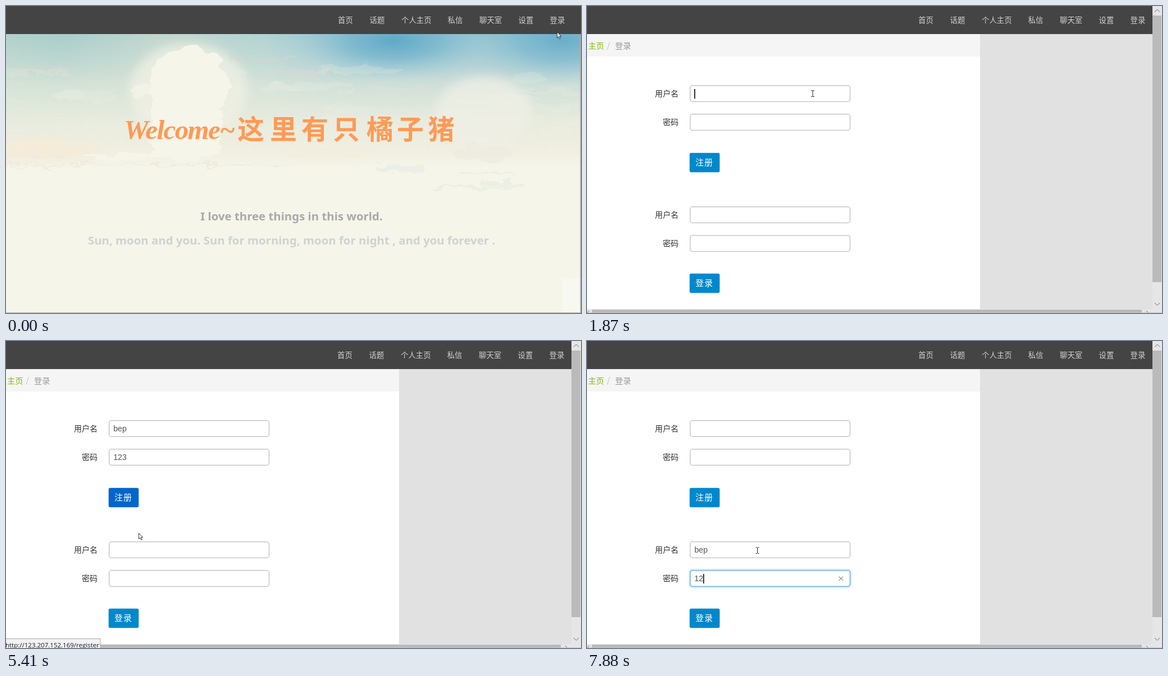
Write an HTML page that moves like this. It is 1024 by 547 pixels and loops after 8 s.

```html
<!DOCTYPE html>
<html lang="zh">
<head>
<meta charset="utf-8">
<title>登录</title>
<style>
html, body { margin: 0; width: 100%; height: 100%; overflow: hidden; background: #fff; }
svg { display: block; width: 100%; height: 100%; }
text { font-family: "Noto Sans CJK SC", "Noto Sans CJK", sans-serif; white-space: pre; }
.nav { font-size: 13.4px; font-weight: 300; fill: #d2d2d2; }
.label { font-size: 14px; font-weight: 350; fill: #333; text-anchor: end; }
.crumb { font-size: 14.2px; font-weight: 350; }
.btn { font-size: 15px; letter-spacing: 1px; fill: #fff; }
.value { font: 14.2px "Liberation Sans", Arial, sans-serif; fill: #555; }
.url { font: 11.5px "Open Sans", sans-serif; fill: #1c1c1c; }
.hello { font: italic bold 49px "Liberation Serif", serif; letter-spacing: -1.6px; }
.title { font-size: 48px; font-weight: 900; }
.line { font: bold 20.4px "Noto Sans", sans-serif; text-anchor: middle; }
</style>
</head>
<body>
<svg id="stage" viewBox="0 0 1024 547">
  <defs>
    <linearGradient id="haze" x1="0" y1="0" x2="0" y2="1">
      <stop offset="0" stop-color="#cfdfd7"/>
      <stop offset=".2" stop-color="#d8e3d9"/>
      <stop offset=".45" stop-color="#e2e8dc"/>
      <stop offset=".7" stop-color="#e9ecdf"/>
      <stop offset=".88" stop-color="#f1efe1"/>
      <stop offset="1" stop-color="#f5f5ea"/>
    </linearGradient>
    <linearGradient id="teal">
      <stop offset="0" stop-color="#b0d1ca"/>
      <stop offset=".1" stop-color="#a8cdca"/>
      <stop offset=".27" stop-color="#c2d7cf"/>
      <stop offset=".45" stop-color="#b2d3d3"/>
      <stop offset=".6" stop-color="#8fc1d0"/>
      <stop offset="1" stop-color="#8bbfd0"/>
    </linearGradient>
    <linearGradient id="fade" x1="0" y1="0" x2="0" y2="1">
      <stop offset="0" stop-color="#fff"/>
      <stop offset=".25" stop-color="#aaa"/>
      <stop offset=".6" stop-color="#333"/>
      <stop offset="1" stop-color="#000"/>
    </linearGradient>
    <radialGradient id="blue">
      <stop offset="0" stop-color="#5fa9c7"/>
      <stop offset=".45" stop-color="#78b6cd" stop-opacity=".75"/>
      <stop offset="1" stop-color="#a5cfd9" stop-opacity="0"/>
    </radialGradient>
    <mask id="sink"><rect y="49" width="1024" height="150" fill="url(#fade)"/></mask>
    <filter id="soft" x="0" y="0" width="1024" height="547" filterUnits="userSpaceOnUse"><feGaussianBlur stdDeviation="9"/></filter>
    <filter id="rough" x="0" y="0" width="1024" height="547" filterUnits="userSpaceOnUse" color-interpolation-filters="sRGB">
      <feTurbulence type="fractalNoise" baseFrequency=".03 .06" numOctaves="3" seed="5"/>
      <feColorMatrix values="1 0 0 0 0  0 1 0 0 0  0 0 1 0 0  0 0 0 0 1"/>
      <feDisplacementMap in="SourceGraphic" scale="26" xChannelSelector="R" yChannelSelector="G"/>
    </filter>
    <filter id="glow" x="-10%" y="-60%" width="120%" height="220%"><feGaussianBlur stdDeviation="2.2"/></filter>
  </defs>
</svg>
<script>
const NS = 'http://www.w3.org/2000/svg', LOOP = 8000, RELOAD = 5500;
const stage = document.getElementById('stage');

function add(parent, tag, attrs, text) {
  const el = document.createElementNS(NS, tag);
  for (const k in attrs) el.setAttribute(k, attrs[k]);
  if (text) el.textContent = text;
  parent.appendChild(el);
  return el;
}
const group = (parent, attrs) => add(parent, 'g', attrs);
const rect = (p, x, y, width, height, fill, more) => add(p, 'rect', { x, y, width, height, fill, ...more });
const blob = (p, cx, cy, rx, ry, fill, opacity = 1) => add(p, 'ellipse', { cx, cy, rx, ry, fill, opacity });
const label = (p, cls, x, y, text, more) => add(p, 'text', { class: cls, x, y, ...more }, text);
const path = (p, d, fill, stroke, more) => add(p, 'path', { d, fill, stroke, ...more });
const show = (el, on) => el.setAttribute('display', on ? 'inline' : 'none');
const clamp = v => Math.max(0, Math.min(1, v));

// Welcome page
const home = group(stage);
rect(home, 0, 0, 1024, 547, '#f5f5ea');
rect(home, 0, 49, 1024, 240, 'url(#haze)');
rect(home, 0, 49, 1024, 150, 'url(#teal)', { mask: 'url(#sink)' });
blob(home, 690, 62, 180, 72, 'url(#blue)');
blob(home, 990, 62, 170, 80, 'url(#blue)', .8);

const mist = group(home, { filter: 'url(#soft)' });
blob(mist, 325, 150, 105, 85, '#f0f1e5', .75);
blob(mist, 850, 190, 85, 65, '#efefe6', .75);
blob(mist, 50, 258, 120, 18, '#f4ebd8', .9);
blob(mist, 570, 258, 80, 12, '#f3eedf', .8);

const paint = group(home, { filter: 'url(#rough)' });
let seed = 11;
const rnd = () => (seed = seed * 16807 % 2147483647) / 2147483647;
for (let i = 0; i < 26; i++)
  blob(paint, rnd() * 1024, 110 + rnd() * 130, 20 + rnd() * 60, 3 + rnd() * 8, '#eeefe4', .22);
blob(paint, 55, 113, 60, 2.5, '#d5d5ce', .6);
blob(paint, 455, 97, 60, 3, '#d5d5cf', .6);
blob(paint, 520, 118, 60, 4, '#d9dad3', .5);
blob(paint, 700, 148, 75, 5, '#dcdfda', .5);
blob(paint, 325, 139, 72, 68, '#f5f5e9');
blob(paint, 238, 150, 18, 16, '#f3f4e7', .8);
rect(paint, 258, 165, 124, 100, '#f5f5e9');
blob(paint, 850, 262, 56, 16, '#eeece1', .8);
blob(paint, 250, 268, 115, 6, '#f5f5ea');
for (const [x, y, w, h] of [[0, 282, 520, 2], [0, 266, 110, 4], [655, 284, 90, 13], [810, 296, 105, 3], [755, 321, 175, 4], [845, 311, 55, 9]])
  rect(paint, x, y, w, h, x < 600 ? '#efecdf' : '#ebefe5');
rect(home, 991, 485, 32, 61, '#f8f8f3');
rect(home, 1022.5, 49, 1.5, 498, '#a9a9a6');
rect(home, 0, 546, 1024, 1, '#a9a9a6');

const banner = group(home, { fill: '#ff9a55' });
label(banner, 'hello', 210, 237, 'Welcome~');
label(banner, 'title', '412 470 526 582 642 696 751', 237, '这里有只橘子猪');
label(home, 'line', 508.5, 382, 'I love three things in this world.', { fill: '#a9a9a9' });
label(home, 'line', 508.5, 425, 'Sun, moon and you. Sun for morning, moon for night , and you forever .', { fill: '#ced3d1' });

// Login page
const login = group(stage);
rect(login, 0, 0, 1024, 547, '#fff');
rect(login, 0, 49, 700, 41, '#f5f5f5');
rect(login, 700, 49, 307, 492, '#e1e1e1');
label(login, 'crumb', 2, 75.5, '主页', { fill: '#80bd01' });
label(login, 'crumb', 35.5, 75, '/', { fill: '#bbb' });
label(login, 'crumb', 50, 75.5, '登录', { fill: '#999' });

function button(y, text) {
  const face = rect(login, 182.7, y - .3, 53.6, 34.6, '#0088cc', { rx: 3 });
  label(login, 'btn', 193, y + 22, text);
  return face;
}
const register = button(262, '注册');
button(477, '登录');

function field(y, name, on, off, keys, value) {
  label(login, 'label', 163, y + 20.3, name);
  const edge = { rx: 4, 'stroke-width': 1.3 };
  const glow = rect(login, 183, y, 286, 30, '#52a8ec', { rx: 4, filter: 'url(#glow)' });
  rect(login, 183.7, y + .7, 284.8, 28.6, '#fff', { ...edge, stroke: '#bfbfbf' });
  rect(login, 185, y + 1.5, 282, 1, '#eee');
  const ring = rect(login, 183.7, y + .7, 284.8, 28.6, 'none', { ...edge, stroke: '#62b0ee' });
  const text = label(login, 'value', 191.2, y + 20, '');
  const caret = rect(login, 191, y + 7, 1.6, 17, '#000');
  const clear = path(login, `M448.5 ${y + 11.5}l7.5 7.5m0 -7.5l-7.5 7.5`, 'none', '#555');
  return { on, off, keys, value, glow, ring, text, caret, clear };
}
const fields = [
  field(141, '用户名', 1870, 3190, [2710, 2800, 2960], 'bep'),
  field(192, '密码', 3190, 4950, [3500, 3730, 3970], '123'),
  field(357, '用户名', 6190, 7300, [6770, 6930, 7120], 'bep'),
  field(408, '密码', 7300, 9000, [7630, 7880], '12')
];

// Navigation
rect(stage, 0, 0, 1024, 50, '#444');
const menu = group(stage);
const links = [['首页', 591], ['话题', 647.5], ['个人主页', 704], ['私信', 786.5], ['聊天室', 843], ['设置', 912.5], ['登录', 968.5]]
  .map(([name, x]) => label(menu, 'nav', x, 30, name));
const loginLink = links[6];

// Scrollbars
const scroll = group(stage);
rect(scroll, 1007, 0, 17, 547, '#e6e6e6');
rect(scroll, 1007, 17, 16, 475, '#bababa');
rect(scroll, 0, 540, 1007, 7, '#e6e6e6');
rect(scroll, 9, 541, 979, 5, '#bababa');
rect(scroll, 0, 546, 1024, 1, '#c4c4c4');
path(scroll, 'M1011 10.5l4.5 -4.5l4.5 4.5M1011 529l4.5 4.5l4.5 -4.5M4 543l-3 3M996 543l3 3', 'none', '#666');

// Link address at the bottom left
const status = group(stage);
const statusBox = rect(status, -1, 530.5, 184, 20, '#f2f2f2', { stroke: '#a8a8a8' });
const statusText = label(status, 'url', -1, 546, '');

// Pointers, drawn from their hot spot
const outline = { 'stroke-width': .9 };
const pointers = {
  arrow: path(stage, 'M.5 .5v10.2l2.4 -2.2l1.8 4l1.7 -.8l-1.8 -3.9h3.2z', '#fff', '#222', outline),
  hand: path(stage, 'M3 7.4V1.2q1.1 -1.2 2.2 0V5.2l3.6 .8q1.2 .4 1 2l-.9 5.4H3.8L.4 8.8q0 -1.5 1.5 -.9z', '#fff', '#222', outline),
  beam: path(stage, 'M-3 -5.2h2.2l.8 .6l.8 -.6h2.2M-3 5.4h2.2l.8 -.6l.8 .6h2.2M0 -4.6v9.4', 'none', '#222')
};

// Each pose holds until the next: time, x, y, pointer
const poses = [
  [0, 981, 46, 'arrow'], [60, 979, 31, 'hand'], [180, 977.5, 25.5, 'hand'],
  [1250, 858, 74, 'arrow'], [1330, 650, 136, 'arrow'], [1510, 428, 151, 'beam'], [1690, 402, 156, 'beam']
];
function glide(t0, t1, steps, [x0, y0], [x1, y1]) {
  for (let i = 1; i <= steps; i++) {
    const k = i / steps, e = k * k * (3 - 2 * k);
    const x = x0 + (x1 - x0) * e, y = y0 + (y1 - y0) * e;
    poses.push([t0 + (t1 - t0) * (i - 1) / (steps - 1), x, y, pointerAt(x, y)]);
  }
}
function pointerAt(x, y) {
  if (x > 183 && [141, 192, 357, 408].some(top => y > top && y < top + 30)) return 'beam';
  return y > 262 && y < 296 && x < 236 ? 'hand' : 'arrow';
}
glide(4340, 4800, 7, [402, 156], [218, 276]);
glide(5200, 5410, 4, [218, 276], [236, 342]);
glide(5500, 5980, 6, [236, 342], [298, 381]);
glide(6040, 6120, 2, [298, 381], [303.5, 373]);

function drawField(f, t) {
  const alive = t < RELOAD || f.on > RELOAD;
  const focused = t >= f.on && t < f.off;
  const typed = alive ? f.keys.filter(k => t >= k) : [];
  const n = typed.length;
  const lit = focused ? clamp((t - f.on) / 160) : t >= f.off ? 1 - clamp((t - f.off) / 160) : 0;
  const idle = (t - (n ? typed[n - 1] : f.on)) % 1060;
  f.ring.setAttribute('opacity', lit);
  f.glow.setAttribute('opacity', lit * .6);
  f.text.textContent = f.value.slice(0, n);
  f.caret.setAttribute('x', 191 + n * 7.95);
  f.caret.setAttribute('opacity', focused ? clamp((550 - idle) / 180) : 0);
  show(f.clear, focused && n > 0);
}

function draw(t) {
  const onLogin = t >= 960;
  show(home, !onLogin);
  show(login, onLogin);
  show(scroll, onLogin);
  menu.setAttribute('transform', `translate(${onLogin ? -1 : 0} 0)`);
  const hover = t >= 60 && t < 960 || t >= 1090 && t < 1250;
  loginLink.style.fill = hover ? '#fff' : '';

  fields.forEach(f => drawField(f, t));
  const pressed = t >= 4720 && t < RELOAD;
  register.setAttribute('fill', pressed ? '#0066cc' : '#0088cc');

  show(status, t >= 180 && t < 1690 || pressed);
  status.setAttribute('opacity', t >= 1510 && t < 1690 ? .5 : 1);
  statusBox.setAttribute('width', pressed ? 169 : 184);
  statusText.textContent = 'http://123.207.152.169/' + (pressed ? 'register' : 'login/view');

  const [, x, y, kind] = poses.filter(p => p[0] <= t).pop();
  for (const k in pointers) show(pointers[k], k === kind);
  pointers[kind].setAttribute('transform', `translate(${x} ${y})`);
}

const start = performance.now();
function tick() {
  draw((performance.now() - start) % LOOP);
  requestAnimationFrame(tick);
}
tick();
</script>
</body>
</html>
```
